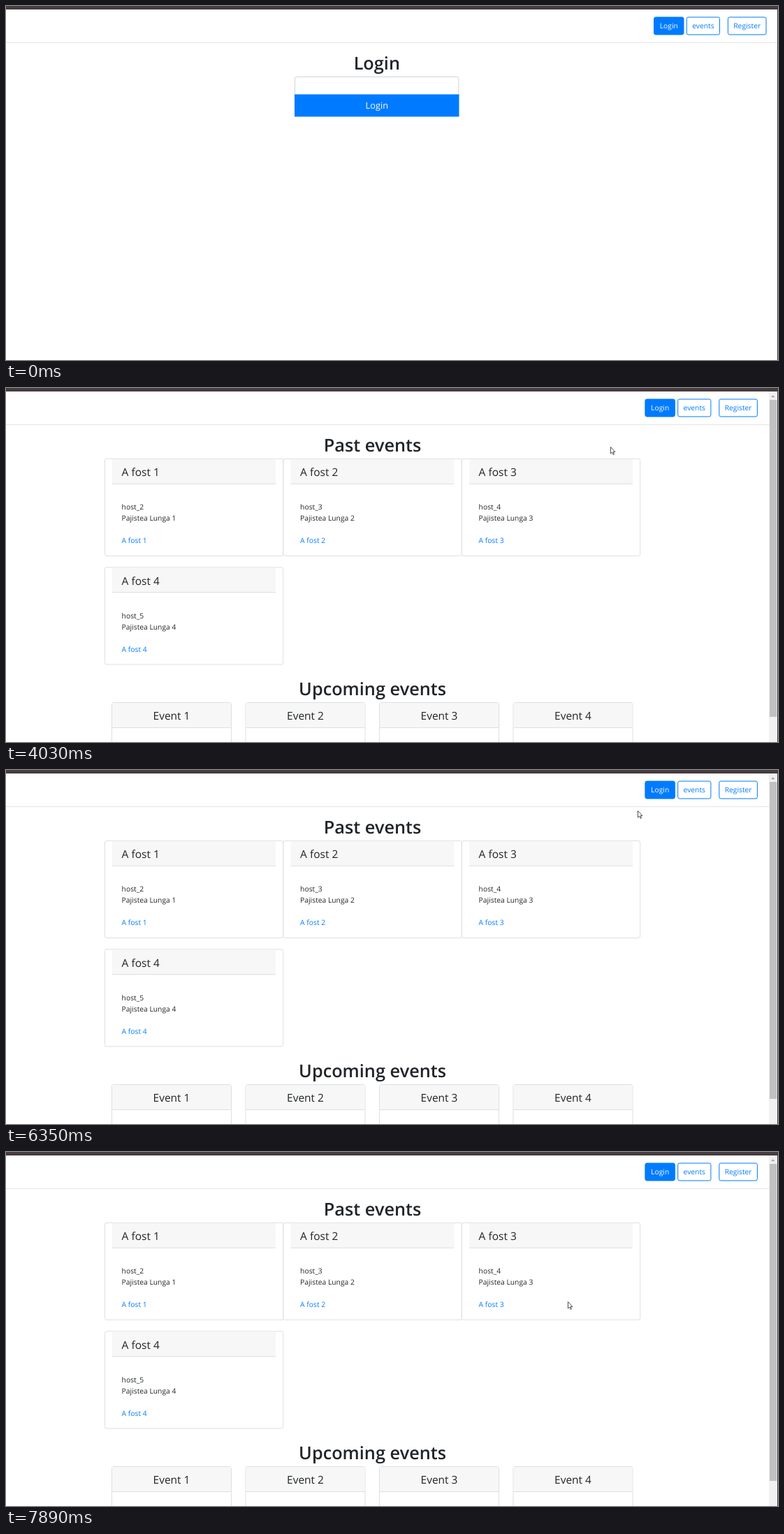
Write an HTML page that moves like this. It is 1105 by 507 pixels and loops after 8000 ms.

```html
<!DOCTYPE html>
<html lang="en">
<head>
<meta charset="utf-8">
<title>Events site</title>
<style>
  html, body { margin: 0; width: 100%; height: 100%; overflow: hidden; background: #fff; }
  svg { display: block; width: 1105px; height: 507px; }
  text { font: 10.3px "Open Sans", "Noto Sans", sans-serif; fill: #212529; text-rendering: geometricPrecision; }
  .h1 { font-size: 25.3px; font-weight: 600; }
  .h4 { font-size: 15.5px; }
  .big { font-size: 12.8px; }
  .mid { text-anchor: middle; }
  .link { fill: #007bff; }
  .white { fill: #fff; }
  .card { fill: #fff; stroke: #dfdfdf; }
  .head { fill: #f7f7f7; }
  .rule { fill: #dfdfdf; }
</style>
</head>
<body>
<svg id="stage" viewBox="0 0 1105 507"></svg>
<script>
const LOOP = 8000;
const PAGE_SWITCH = 1840;
const NAV_SHIFT = 12.6; // the scrollbar pushes the nav to the left

// the picture only changes on ticks: first time, last time, tick count
const bursts = [
  [0, 100, 2], [200, 510, 4], [730, 1510, 8], [1630, 1840, 2], [3250, 4030, 8],
  [4360, 5140, 8], [5240, 5700, 5], [6030, 6350, 2], [6460, 6570, 2]
];
const ticks = bursts.flatMap(([from, to, n]) =>
  Array.from({ length: n }, (_, k) => Math.floor(from + k * (to - from) / (n - 1))));

// time, x, y
const path = [
  [0, 1100, 600], [100, 1072, 492], [310, 1030, 260], [510, 982, 86],
  [950, 988, 30], [1180, 972, 1], [1290, 960, 14], [1510, 991, 34], [1840, 991, 34],
  [3250, 1003, 35], [3470, 1044, 30], [3690, 1002, 36], [4030, 865, 84],
  [4690, 896, 188], [5140, 896, 188], [5700, 948, 28], [6030, 947, 27],
  [6350, 904, 58], [6570, 804, 214]
];

// wheel turns: start time and the offsets that follow, one per wheel tick
const WHEEL_TICK = 110;
const down = [13, 42, 66.5, 79], up = [68, 49.5, 12, 0];
const wheel = [[4360, down], [4806, up], [6800, down], [7550, up]];

// left edge and width on the page without a scrollbar
const buttons = [
  { id: "login", label: "Login", x: 927, w: 43.5, solid: true },
  { id: "events", label: "events", x: 973.8, w: 48.2 },
  { id: "register", label: "Register", x: 1032.9, w: 55.6 }
];

const text = (x, y, str, cls = "") => `<text x="${x}" y="${y}" class="${cls}">${str}</text>`;
const rect = (x, y, w, h, attrs) => `<rect x="${x}" y="${y}" width="${w}" height="${h}" ${attrs}/>`;

function navButton({ id, label, x, w }) {
  return rect(x + .5, 16, w - 1, 25, `id="${id}" rx="2.4" fill="#007bff" stroke="#007bff"`) +
    text(x + w / 2, 32.3, label, "mid");
}

function pastCard(i) {
  const x = 141.4 + (i % 3) * 255.5, y = i < 3 ? 101.4 : 256.9, n = i + 1;
  return rect(x, y, 255.3, 139, 'rx="2.6" class="card"') +
    rect(x + 10.6, y + .5, 234, 35.5, 'class="head"') +
    rect(x + 10.6, y + 35.4, 234, 1, 'class="rule"') +
    text(x + 24.2, y + 24.7, `A fost ${n}`, "h4") +
    text(x + 24.2, y + 72.6, `host_${n + 1}`) +
    text(x + 24.2, y + 88.7, `Pajistea Lunga ${n}`) +
    text(x + 24.2, y + 121, `A fost ${n}`, "link");
}

function upcomingCard(creator, i) {
  const x = 151.5 + i * 191.5, y = 450.5, mid = x + 85.5, n = i + 1;
  return rect(x, y, 171, 140, 'rx="2.6" class="card"') +
    rect(x + .5, y + .5, 170, 35.5, 'class="head"') +
    rect(x, y + 35.5, 171, 1, 'class="rule"') +
    text(mid, y + 24.4, `Event ${n}`, "h4 mid") +
    text(mid, y + 72.2, `Event creator: ${creator}`, "mid") +
    text(mid, y + 88.3, `Iarba Moale ${n}`, "mid") +
    text(mid, y + 120.5, "See event", "mid link");
}

const loginPage =
  text(530.8, 90.5, "Login", "h1 mid") +
  rect(413.5, 101.5, 234.5, 28, 'rx="2.6" fill="#fff" stroke="#ced4da"') +
  rect(413, 126.5, 235.5, 32, 'fill="#007bff"') +
  text(530.8, 147.3, "Login", "big mid white");

const eventsPage =
  text(524.6, 90.5, "Past events", "h1 mid") +
  [0, 1, 2, 3].map(pastCard).join("") +
  text(524.6, 440, "Upcoming events", "h1 mid") +
  ["Orela", "Velmir", "Tudora", "host_0"].map(upcomingCard).join("");

const scrollbar =
  rect(1092, 5, 12, 502, 'fill="#f1f1f1"') +
  '<path id="up" d="M1095 13.2h5.6l-2.8-3z"/>' +
  rect(1093, 17, 10.3, 454, 'id="thumb" fill="#c1c1c1"');

const arrow = '<path id="arrow" d="M.4 .5V10L2.6 8 4.1 11.4 5.5 10.8 4.1 7.5H6.9Z" fill="#fff" stroke="#222" stroke-width=".8"/>';
const hand = '<path id="hand" d="M-1 8V1.5Q0-.5 1 1.5V5Q2.4 4.4 2.8 5.6 4 5 4.4 6.1 6 5.6 6 7.2V10L5 12.4V13.6H0V12.4L-2.7 8.8Q-3.2 6.6-1 8Z" fill="#fff" stroke="#222" stroke-width=".85" stroke-linejoin="round"/>';

document.getElementById("stage").innerHTML =
  `<g id="page">
    <g id="nav">${buttons.map(navButton).join("")}</g>
    ${rect(0, 52, 1104, 1, 'fill="#e4e4e4"')}
    <g id="loginPage">${loginPage}</g>
    <g id="eventsPage">${eventsPage}</g>
  </g>
  <g id="scrollbar">${scrollbar}</g>
  ${rect(0, 0, 1105, 5, 'fill="#463d40"')}
  ${rect(1104, 5, 1, 502, 'fill="#474044"')}
  <g id="pointer">${arrow}${hand}</g>`;

const el = id => document.getElementById(id);
const show = (id, on) => el(id).setAttribute("display", on ? "inline" : "none");
const move = (id, x, y) => el(id).setAttribute("transform", `translate(${x} ${y})`);

function pointerAt(t) {
  const i = path.findLastIndex(p => p[0] <= t);
  const [t0, x0, y0] = path[i];
  const [t1, x1, y1] = path[i + 1] || path[i];
  const k = t1 > t0 ? (t - t0) / (t1 - t0) : 0;
  return [x0 + (x1 - x0) * k, y0 + (y1 - y0) * k];
}

function scrollAt(t) {
  const turn = wheel.findLast(w => w[0] <= t);
  return turn ? turn[1][Math.min(3, Math.floor((t - turn[0]) / WHEEL_TICK))] : 0;
}

function draw(t) {
  const i = ticks.findLastIndex(tick => tick <= t);
  const [x, y] = pointerAt(ticks[i]);
  const [lastX, lastY] = pointerAt(ticks[Math.max(0, i - 1)]);
  const scroll = scrollAt(t);
  const onEvents = t >= PAGE_SWITCH;
  const shift = onEvents ? NAV_SHIFT : 0;

  const over = (b, px, py) =>
    scroll === 0 && px >= b.x - shift && px <= b.x + b.w - shift && py >= 16 && py <= 41;

  let pointing = false;
  for (const b of buttons) {
    const hover = over(b, x, y);
    pointing ||= hover;
    // the hover fill takes one tick to reach full strength
    const fill = b.solid ? 1 : !hover ? 0 : over(b, lastX, lastY) ? 1 : .6;
    el(b.id).setAttribute("fill-opacity", fill);
    el(b.id).nextElementSibling.setAttribute("class", fill ? "mid white" : "mid link");
  }

  show("loginPage", !onEvents);
  show("eventsPage", onEvents);
  show("scrollbar", onEvents);
  move("nav", -shift, 0);
  move("page", 0, -scroll);
  move("thumb", 0, scroll * .836);
  el("up").setAttribute("fill", scroll ? "#505050" : "#a3a3a3");
  move("pointer", x, y);
  show("hand", pointing);
  show("arrow", !pointing);
}

const start = performance.now();
function frame() {
  draw((performance.now() - start) % LOOP);
  requestAnimationFrame(frame);
}
frame();
</script>
</body>
</html>
```
